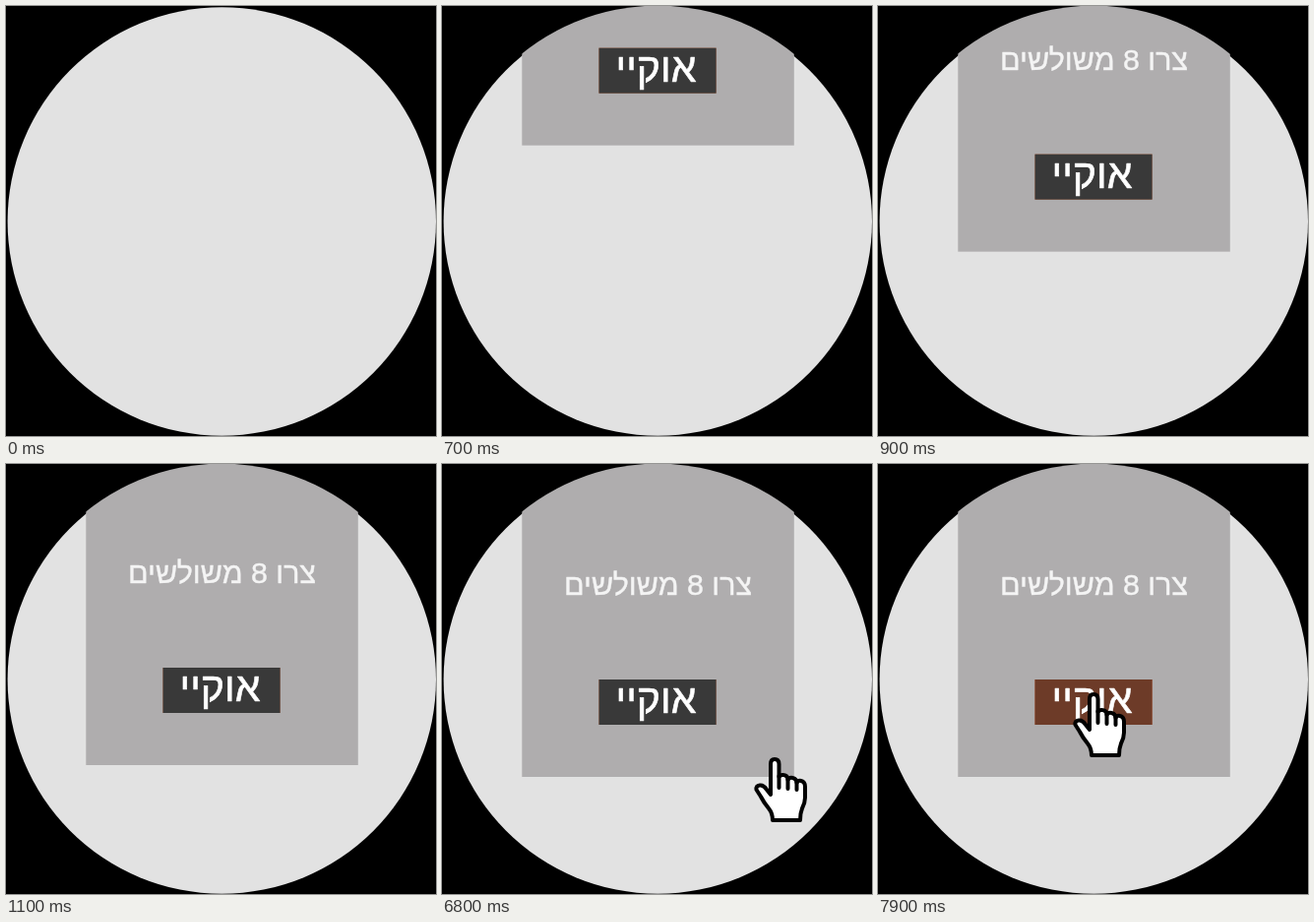
Write an HTML page with a canvas that moves like this. It is 437 px wide and 437 px high and loops after 8 s.

```html
<!DOCTYPE html>
<html lang="he">
<head>
<meta charset="utf-8">
<style>
  html, body { margin: 0; height: 100%; overflow: hidden; background: #000; }
  canvas { display: block; }
</style>
</head>
<body>
<canvas id="stage" width="437" height="437"></canvas>
<script>
const ctx = document.getElementById('stage').getContext('2d');
const LOOP = 8000, STEP = 100;
const clamp = v => Math.min(1, Math.max(0, v));
const smooth = v => v * v * (3 - 2 * v);
const mix = (a, b, p) => `rgb(${a.map((v, i) => Math.round(v + (b[i] - v) * p))})`;

const handOutline = new Path2D(`M17 38 V7 Q17 2 21 2 Q25.5 2 25.5 7 V20
  Q27 17.5 30 18 Q34.5 18.5 34.5 23 Q36 20 39.5 21 Q43.5 22 43.5 26
  Q45 23 48 24 Q52 25 52 30 V41 Q52 46 49 52 Q47 57 47 64
  H19 Q19 57 15 52 Q10 46 7 40 L2.5 33 Q2 29 6 28.5 Q10 28 13 33 Z`);
const fingerLines = new Path2D('M25.5 19 V31 M34.5 22 V32 M43.5 25 V33');

function disc(radius) {
  ctx.beginPath();
  ctx.arc(219.3, 219, radius, 0, 2 * Math.PI);
}

function rect(x, y, w, h, color) {
  ctx.fillStyle = color;
  ctx.fillRect(x, y, w, h);
}

// The thin round stroke softens the corners of the letters
function label(text, x, y, size, color) {
  ctx.font = `${size}px "Liberation Sans", Arial, sans-serif`;
  ctx.fillStyle = ctx.strokeStyle = color;
  ctx.lineWidth = size * 0.015;
  ctx.fillText(text, x, y);
  ctx.strokeText(text, x, y);
}

// Lower edge of the panel as it drops in and slows down
function panelBottom(t) {
  const left = Math.max(0, 12.6 - t / 100);
  return Math.max(10, 318 - 4.38 * left ** 2.145);
}

function drawPanel(t) {
  const bottom = panelBottom(t);
  const hover = clamp((t - 7600) / 300);
  const button = [159.5, bottom - 99, 119.1, 46];
  ctx.save();
  disc(219.4);
  ctx.clip();
  rect(81.3, bottom - 330, 276.5, 330, '#afadae');
  label('צרו 8 משולשים', 219.5, bottom - 185, 30.4, '#f4f4f4');
  rect(...button, '#c8663a');
  rect(...button, mix([57, 57, 57], [109, 59, 40], hover));
  label('אוקיי', 217.5, bottom - 65, 41, '#fff');
  ctx.restore();
}

function drawHand(t) {
  const p = smooth(clamp((t - 6800) / 400));
  ctx.save();
  ctx.translate(317 - 119 * p, 298 - 66 * p);
  ctx.fillStyle = '#fff';
  ctx.strokeStyle = '#000';
  ctx.lineWidth = 4;
  ctx.fill(handOutline);
  ctx.stroke(handOutline);
  ctx.stroke(fingerLines);
  ctx.restore();
}

function draw() {
  const t = Math.floor((performance.now() - start) % LOOP / STEP) * STEP;
  rect(0, 0, 437, 437, '#000');
  ctx.fillStyle = '#e2e2e2';
  disc(217.7);
  ctx.fill();
  if (t >= 500) drawPanel(t);
  if (t >= 6800) drawHand(t);
  requestAnimationFrame(draw);
}

ctx.textAlign = 'center';
ctx.direction = 'rtl';
ctx.lineJoin = ctx.lineCap = 'round';
const start = performance.now();
draw();
</script>
</body>
</html>
```
